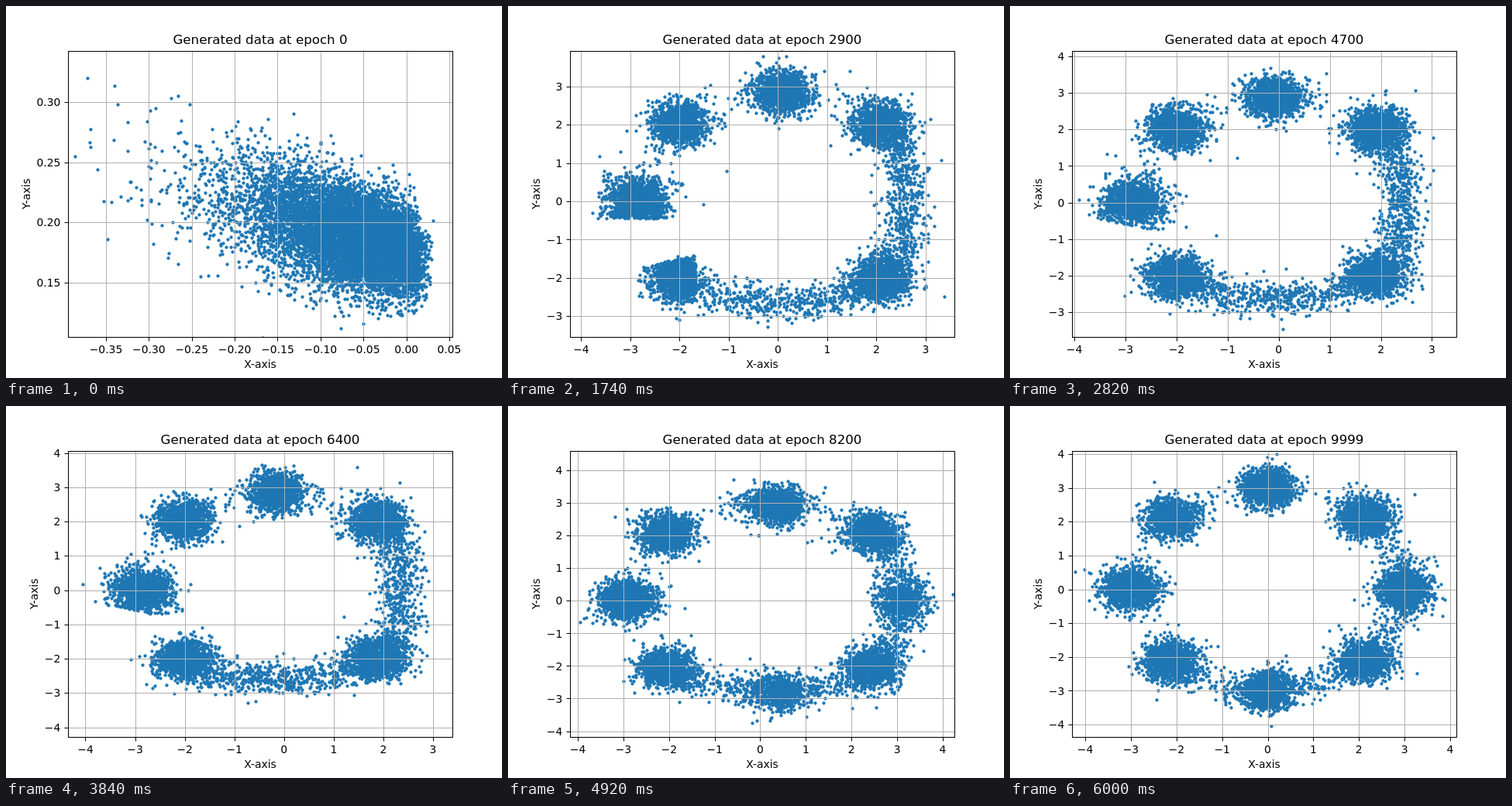
Recreate the animation shown at these times as an HTML page with a canvas. Size 640x480 px, loop 6060 ms.

```html
<!DOCTYPE html>
<html lang="en">
<head>
<meta charset="utf-8">
<title>Generated data</title>
<style>
  html, body { margin: 0; width: 640px; height: 480px; overflow: hidden; background: #fff; }
  canvas, svg { position: absolute; left: 0; top: 0; }
  text { font: 13.89px "DejaVu Sans", sans-serif; }
  .title { font-size: 16.67px; }
  .grid { stroke: #b0b0b0; }
  .axis { stroke: #000; fill: none; }
  .mid { text-anchor: middle; }
  .end { text-anchor: end; }
</style>
</head>
<body>
<canvas id="points" width="640" height="480"></canvas>
<svg id="chart" width="640" height="480"></svg>
<script>
const STEP = 60, STEPS = 101, FIRST = 14, FONT = 13.89;
const LEFT = 80, RIGHT = 576, TOP = 57.6, BOTTOM = 427.2;
const START_VIEW = [-.3942, .0536, .1045, .343];

// Axis limits (x min, x max, y min, y max) and sideways drift of the right half.
const KEYS = [
  { at: 14, view: [-4.535, 3.753, -4.474, 4.42], drift: -.08 },
  { at: 29, view: [-4.228, 3.583, -3.545, 3.935], drift: .08 },
  { at: 47, view: [-4.046, 3.478, -3.683, 4.157], drift: -.1 },
  { at: 64, view: [-4.351, 3.39, -4.287, 4.066], drift: -.15 },
  { at: 82, view: [-4.17, 4.255, -4.183, 4.604], drift: .38 },
  { at: 100, view: [-4.289, 4.136, -4.37, 4.1], drift: 0 }
];
const [W, NW, N, NE, E, SE, S, SW] = Array(8).keys();

const ctx = document.getElementById('points').getContext('2d');
const chart = document.getElementById('chart');
const mix = (a, b, u) => a + (b - a) * u;
const mixAll = (a, b, u) => a.map((v, i) => mix(v, b[i], u));
const ramp = (a, b, t) => Math.min(1, Math.max(0, (t - a) / (b - a)));
const snap = v => Math.floor(v + .5) + .5;

ctx.beginPath();
ctx.rect(LEFT, TOP, RIGHT - LEFT, BOTTOM - TOP);
ctx.clip();

const dot = document.createElement('canvas');
dot.width = dot.height = 5;
const pen = dot.getContext('2d');
pen.fillStyle = '#1f77b4';
pen.arc(2.5, 2.5, 2.15, 0, 7);
pen.fill();

function makeRandom(seed) {
  let s = seed * 7919 + 12345 | 0;
  return () => {
    s = s + 0x6D2B79F5 | 0;
    let r = Math.imul(s ^ s >>> 15, 1 | s);
    r = r + Math.imul(r ^ r >>> 7, 61 | r) ^ r;
    return ((r ^ r >>> 14) >>> 0) / 4294967296;
  };
}

function stateAt(t, normal) {
  const time = Math.max(t, FIRST);
  const i = Math.min(KEYS.findLastIndex(k => k.at <= time), KEYS.length - 2);
  const a = KEYS[i], b = KEYS[i + 1], u = ramp(a.at, b.at, time);
  const shake = v => v + normal() * .32 * u * (1 - u);
  const grown = 1 - (1 - ramp(0, FIRST, t)) ** 3;
  const view = mixAll(a.view, b.view, u).map(shake);
  return { grown, view: mixAll(START_VIEW, view, grown), drift: shake(mix(a.drift, b.drift, u)), shake };
}

// Eight clusters on a ring; links scatter points along the arc between neighbours.
function partsAt(t, shake) {
  const split = ramp(14, 29, t), fill = ramp(64, 100, t);
  const base = mix(3.12, 2.85, split) + .15 * fill;
  const modes = Array.from({ length: 8 }, (_, i) => {
    const sag = i === E ? .4 : i === S ? .25 * split : 0;
    const angle = 180 - 45 * i + (i === SW ? 40 * (1 - split) : 0);
    return { angle: angle * Math.PI / 180, radius: shake(base - sag * (1 - fill)) };
  });
  const clusterSize = i => 1300 * (i === SE ? split : i === E || i === S ? fill : 1);
  const linkSize = i => i < NE ? 35 : mix(900, 340, split) - 180 * fill;

  const clusters = modes.map((m, i) => ({ count: clusterSize(i), from: m, to: m, spread: i === W ? .3 : .27, mode: i }));
  const links = modes.slice(1).map((m, i) =>
    ({ count: linkSize(i), from: modes[i], to: m, spread: mix(.17, .23, split) }));
  return [...clusters, ...links];
}

// The western cluster has a sharp lower edge, the south-western one briefly a wedge.
function fold(mode, x, y, t) {
  const mirror = (v, edge, sign) => sign * (v - edge) > 0 ? 2 * edge - v : v;
  if (mode === W && t > 20 && t < 72)
    y = mirror(y, -.46 - .29 * ramp(29, 47, t) * (x + 3.5), -1);
  if (mode === SW && t > 20 && t < 40) {
    x = mirror(x, -1.67, 1);
    y = mirror(y, -.9 + .3 * x, 1);
  }
  return [x, y];
}

function ticks(lo, hi) {
  const raw = (hi - lo) / 9, power = 10 ** Math.floor(Math.log10(raw));
  const step = [1, 2, 2.5, 5, 10].find(s => s * power >= raw) * power;
  let digits = 0;
  while (digits < 4 && Math.abs(step * 10 ** digits - Math.round(step * 10 ** digits)) > 1e-6) digits++;
  const list = [];
  for (let n = Math.ceil(lo / step); n * step <= hi; n++)
    list.push({ value: n * step, label: (n < 0 ? '\u2212' : '') + Math.abs(n * step).toFixed(digits) });
  return list;
}

const labelWidth = s => FONT * [...s].reduce((w, c) => w + (c === '\u2212' ? .838 : c === '.' ? .318 : .636), 0);
const line = (cls, x1, y1, x2, y2) => `<line class="${cls}" x1="${x1}" y1="${y1}" x2="${x2}" y2="${y2}"/>`;
const text = (cls, x, y, s, more = '') => `<text class="${cls}" x="${x}" y="${y}" ${more}>${s}</text>`;

function drawChart(t, view, px, py) {
  const l = snap(LEFT), r = snap(RIGHT), top = snap(TOP), b = snap(BOTTOM);
  const yTicks = ticks(view[2], view[3]);
  let grid = '', marks = '';
  for (const { value, label } of ticks(view[0], view[1])) {
    const x = snap(px(value));
    grid += line('grid', x, top, x, b);
    marks += line('axis', x, b, x, b + 5) + text('mid', px(value), 448, label);
  }
  for (const { value, label } of yTicks) {
    const y = snap(py(value));
    grid += line('grid', l, y, r, y);
    marks += line('axis', l - 5, y, l, y) + text('end', 70.3, Math.round(py(value) + 5.2), label);
  }
  const labelX = 61.7 - Math.max(...yTicks.map(k => labelWidth(k.label)));
  chart.innerHTML = grid + marks +
    `<rect class="axis" x="${l}" y="${top}" width="${r - l}" height="${b - top}"/>` +
    text('mid title', 328, 49, 'Generated data at epoch ' + Math.min(t * 100, 9999)) +
    text('mid', 328, 467, 'X-axis') +
    text('mid', 0, 0, 'Y-axis', `transform="translate(${labelX} 242.4) rotate(-90)"`);
}

function draw(t) {
  const random = makeRandom(t + 1);
  const normal = () => Math.sqrt(-2 * Math.log(1 - random())) * Math.cos(2 * Math.PI * random());
  const { view, grown, drift, shake } = stateAt(t, normal);
  const px = x => mix(LEFT, RIGHT, (x - view[0]) / (view[1] - view[0]));
  const py = y => mix(BOTTOM, TOP, (y - view[2]) / (view[3] - view[2]));

  ctx.clearRect(0, 0, 640, 480);
  for (const { count, from, to, spread, mode } of partsAt(t, shake)) {
    for (let i = 0; i < count; i++) {
      const along = random(), reach = spread * (random() < .04 ? 1.6 : 1);
      const angle = mix(from.angle, to.angle, along), radius = mix(from.radius, to.radius, along);
      let [x, y] = fold(mode,
        radius * Math.cos(angle) + normal() * reach,
        radius * Math.sin(angle) + normal() * reach, t);
      x += drift * ramp(-1.5, 0, x);
      if (grown < 1) {
        // The untrained cloud: a skewed tail to the left that rises and widens.
        const d = -.033 * Math.log((1 - random()) * (1 - random()) * (1 - random()));
        x = mix(.033 - d, x, grown);
        y = mix(.168 + .21 * d + normal() * (.017 + .045 * d), y, grown);
      }
      ctx.drawImage(dot, Math.floor(px(x)) - 2, Math.floor(py(y)) - 2);
    }
  }
  drawChart(t, view, px, py);
}

let shown = -1;
function play() {
  const t = Math.floor(performance.now() / STEP) % STEPS;
  if (t !== shown) draw(shown = t);
  requestAnimationFrame(play);
}
play();
</script>
</body>
</html>
```
